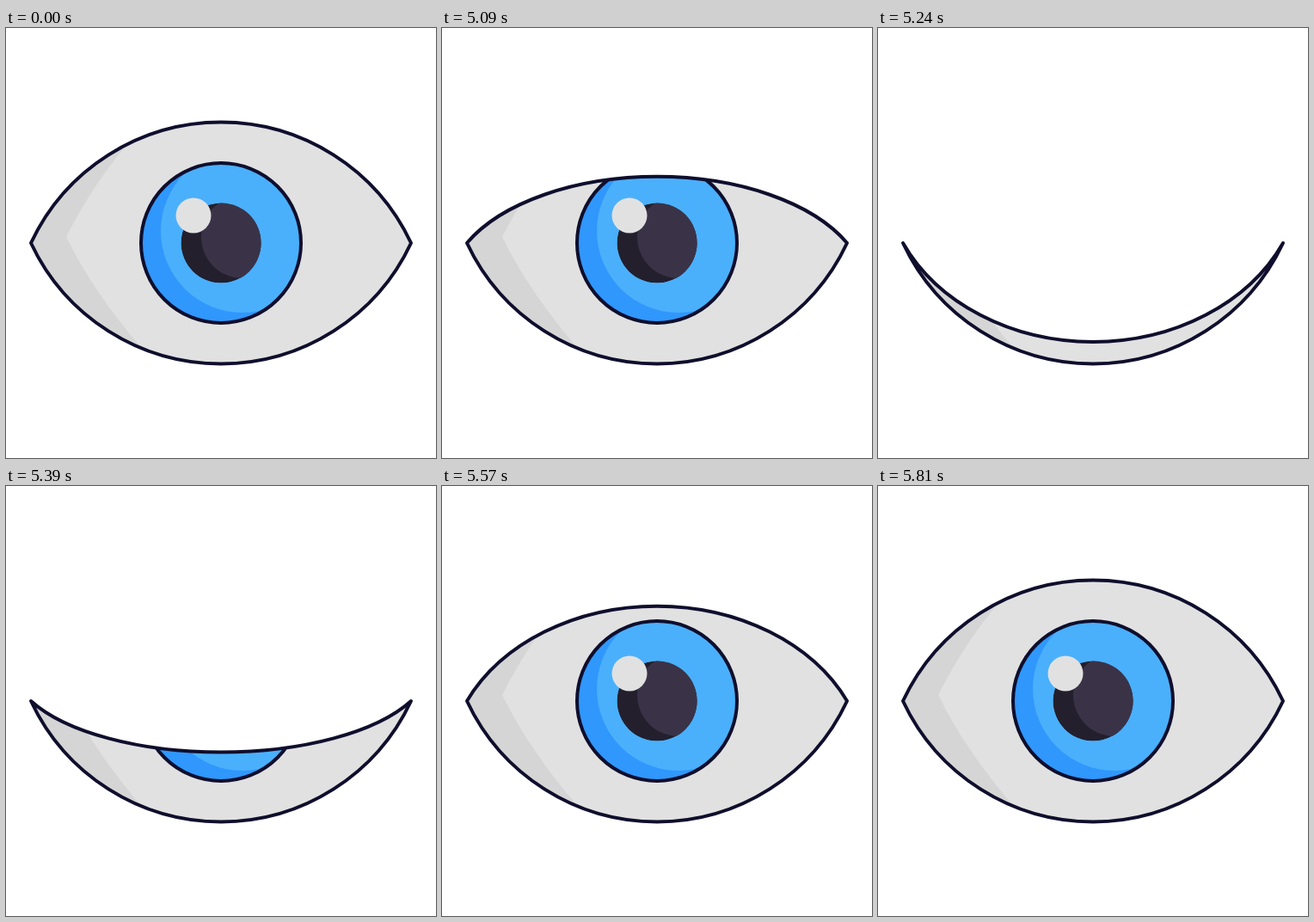
Write an HTML page that moves like this. It is 500 px wide and 500 px high and loops after 5840 ms.

```html
<!DOCTYPE html>
<html lang="en">
<head>
<meta charset="utf-8">
<title>Blinking eye</title>
<style>
  html, body { margin: 0; width: 100%; height: 100%; overflow: hidden; background: #fff; }
  svg { display: block; width: 100vw; height: 100vh; }
  .line { fill: none; stroke: #0f0e2d; stroke-width: 4; stroke-linejoin: round; }
</style>
</head>
<body>
<svg viewBox="0 0 500 500">
  <defs>
    <clipPath id="eyeClip"><path id="eyeShape"/></clipPath>
    <clipPath id="irisClip"><circle cx="250" cy="250" r="93"/></clipPath>
    <clipPath id="pupilClip"><circle cx="250" cy="250" r="46.5"/></clipPath>
  </defs>
  <g clip-path="url(#eyeClip)">
    <rect width="500" height="500" fill="#e1e1e1"/>
    <path fill="#d5d5d5" d="M0 100 L143 133 Q102 180 70 243 Q102 308 160 375 L0 400 Z"/>
    <g clip-path="url(#irisClip)">
      <circle cx="250" cy="250" r="93" fill="#3097fd"/>
      <circle cx="275" cy="236" r="95" fill="#4ab0fc"/>
    </g>
    <circle class="line" cx="250" cy="250" r="93"/>
    <g clip-path="url(#pupilClip)">
      <circle cx="250" cy="250" r="46.5" fill="#241f2d"/>
      <circle cx="275" cy="243" r="48" fill="#3a3348"/>
      <path fill="#3a3348" d="M275 195 H310 V291 H275 Z"/>
    </g>
    <circle cx="218" cy="218" r="20.5" fill="#e1e1e1"/>
  </g>
  <path id="outline" class="line"/>
</svg>
<script>
  const LOOP = 5840, FIRST_STEP = 5030, STEP = 30;
  const CLOSE_START = 4999, CLOSE_TIME = 296;
  const OPEN_START = 5290, OPEN_TIME = 520;
  const paths = ["eyeShape", "outline"].map(id => document.getElementById(id));

  const clamp = v => Math.min(1, Math.max(0, v));
  const smooth = s => s * s * (3 - 2 * s);

  // cubic-bezier(1/3, 0, 0, 1), solved by bisection
  function easeOpen(x) {
    let low = 0, high = 1;
    for (let i = 0; i < 30; i++) {
      const s = (low + high) / 2;
      if (s * (1 - s) ** 2 + s ** 3 < x) low = s; else high = s;
    }
    return smooth((low + high) / 2);
  }

  // 0 is wide open, 1 is shut
  function closure(time) {
    if (time < FIRST_STEP) return 0;
    const t = FIRST_STEP + Math.floor((time - FIRST_STEP) / STEP) * STEP;
    if (t < OPEN_START) return smooth(clamp((t - CLOSE_START) / CLOSE_TIME));
    const x = clamp((t - OPEN_START) / OPEN_TIME);
    return x === 1 ? 0 : 1 - easeOpen(x);
  }

  function eyePath(lid) {
    const y = d => (250 + d).toFixed(2);
    const corner = 85.8, apex = 140.5;
    return `M29 250 C69.2 ${y(-corner * lid)} 155.3 ${y(-apex * lid)} 250 ${y(-apex * lid)}` +
      ` C344.7 ${y(-apex * lid)} 430.8 ${y(-corner * lid)} 471 250` +
      ` C430.8 ${y(corner)} 344.7 ${y(apex)} 250 ${y(apex)}` +
      ` C155.3 ${y(apex)} 69.2 ${y(corner)} 29 250 Z`;
  }

  function draw(time) {
    const d = eyePath(1 - 2 * closure(time));
    paths.forEach(p => p.setAttribute("d", d));
  }

  const start = performance.now();
  function tick() {
    draw((performance.now() - start) % LOOP);
    requestAnimationFrame(tick);
  }
  tick();
</script>
</body>
</html>
```
